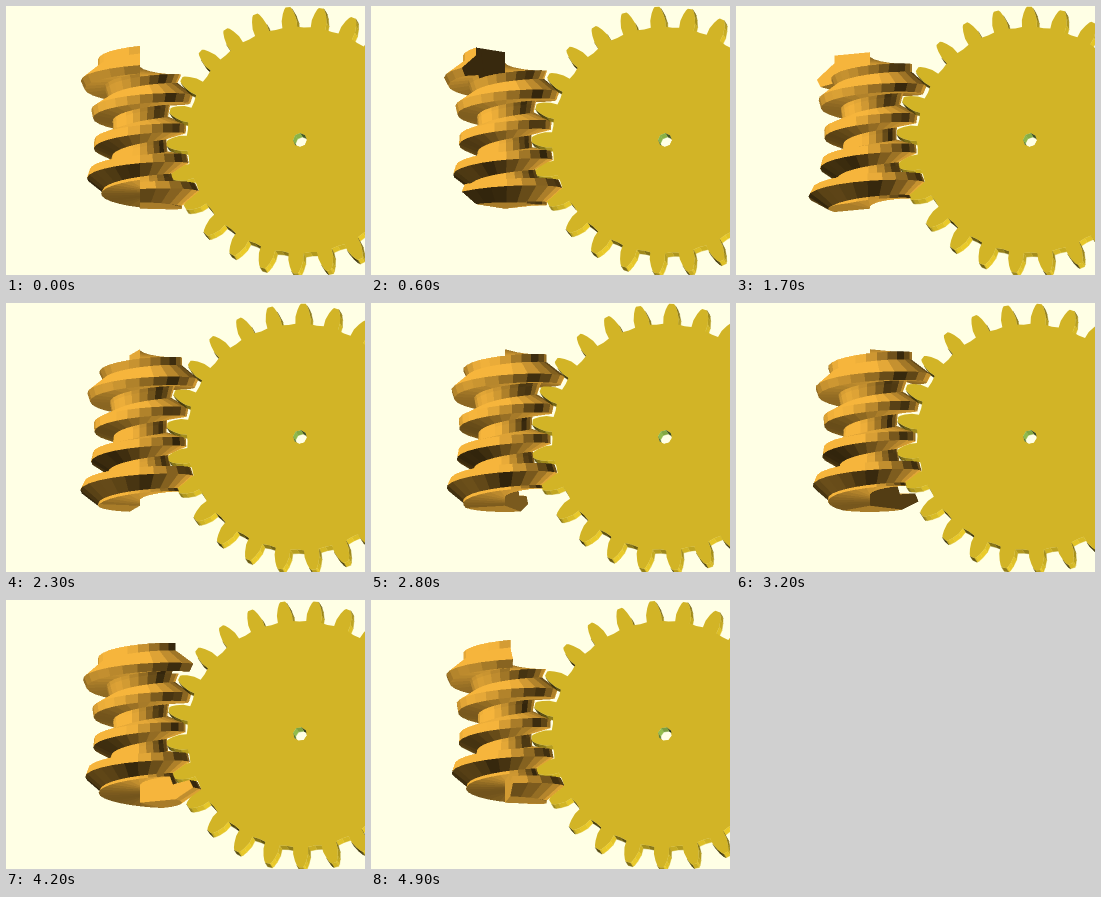
Animation, 359 px wide and 269 px high, one loop 5 s. Source, as an HTML page with a canvas:

```html
<!DOCTYPE html>
<html lang="en">
<head>
<meta charset="utf-8">
<title>Worm drive</title>
<style>
  html, body { margin: 0; width: 100%; height: 100%; overflow: hidden; background: #ffffe5; }
  canvas { display: block; width: 359px; height: 269px; }
</style>
</head>
<body>
<canvas id="stage" width="359" height="269"></canvas>
<script>
const LOOP = 5000, STEPS = 50;
const BG = '#ffffe5', FACE = '#d2b426';
const GEAR_RGB = [249, 215, 44], WORM_RGB = [246, 181, 60], HOLE_RGB = [157, 203, 81];
const RAD = Math.PI / 180, PITCH = 14.4;

const ctx = document.getElementById('stage').getContext('2d');

// One light from the upper left; faces are lit from both sides.
function shade(rgb, x, y, z) {
  const len = Math.hypot(x, y, z) || 1;
  const f = Math.min(1, 0.2 + Math.abs(-x + y + z) / len / Math.sqrt(3));
  return rgb.map(c => Math.round(c * f));
}

// ---- Gear ----
const GEAR = { x: 294, y: 134, teeth: 25, dx: 2.5, dy: 4 };
const TOOTH = [[113, 7.4], [120, 7.5], [127, 5.7], [131.5, 3.8], [133.3, 2.4]];

function gearPoint(a, r, w) {
  const s = Math.sin(a), c = Math.cos(a);
  return [GEAR.x + r * s + w * c, GEAR.y - r * c + w * s];
}

function gearOutline(t) {
  const pts = [];
  for (let k = 0; k < GEAR.teeth; k++) {
    const a = (PITCH * (k + t) - 5.2) * RAD;
    for (const [r, w] of TOOTH) pts.push(gearPoint(a, r, -w));
    for (const [r, w] of [...TOOTH].reverse()) pts.push(gearPoint(a, r, w));
    pts.push(gearPoint(a + PITCH / 2 * RAD, 112.5, 0));
  }
  return pts;
}

function holeOutline(t) {
  return Array.from({ length: 8 }, (_, i) =>
    gearPoint((45 * i + PITCH * t) * RAD, 7, 0));
}

function trace(pts, dx = 0, dy = 0) {
  pts.forEach(([x, y], i) => i ? ctx.lineTo(x + dx, y + dy) : ctx.moveTo(x + dx, y + dy));
  ctx.closePath();
}

// Side walls between the front outline and its shifted copy at the back.
function walls(pts, rgb, side) {
  const { dx, dy } = GEAR;
  pts.forEach((p, i) => {
    const q = pts[(i + 1) % pts.length];
    const nx = (q[1] - p[1]) * side, ny = (p[0] - q[0]) * side;
    if (nx * dx + ny * dy <= 0) return;
    const len = Math.hypot(nx, ny);
    ctx.fillStyle = ctx.strokeStyle = `rgb(${shade(rgb, nx / len, -ny / len, 0.12)})`;
    ctx.lineWidth = 0.4;
    ctx.beginPath();
    trace([p, q, [q[0] + dx, q[1] + dy], [p[0] + dx, p[1] + dy]]);
    ctx.fill();
    ctx.stroke();
  });
}

function drawGear(t) {
  const rim = gearOutline(t), hole = holeOutline(t);
  walls(rim, GEAR_RGB, 1);
  ctx.fillStyle = FACE;
  ctx.beginPath();
  trace(rim);
  ctx.fill();

  ctx.save();
  ctx.beginPath();
  trace(hole);
  ctx.clip();
  ctx.fillStyle = BG;
  ctx.fill();
  walls(hole, HOLE_RGB, -1);
  ctx.restore();
}

// ---- Worm ----
const WORM = { x: 134, y: 130.5, dist: 167.6, tip: 122, core: 141, turns: 4, facets: 24 };
const TILT_S = 0.15, TILT_C = Math.sqrt(1 - TILT_S * TILT_S);
const FRONT = 13;                                  // depth of the gear's front face
const BOX = { x: 60, y: 30, w: 145, h: 185, k: 2 }; // drawn at double size
const W = BOX.w * BOX.k, H = BOX.h * BOX.k;

function layer() {
  const c = document.createElement('canvas');
  c.width = W;
  c.height = H;
  const g = c.getContext('2d');
  return { c, g, img: g.createImageData(W, H) };
}
const back = layer(), front = layer();
const depth = new Float32Array(W * H);

// Cross-section of the thread as [radius, height], from the top of the axis to its bottom.
function profile(mid) {
  const at = (r, off) => {
    const a = (mid + off) * RAD;
    return [WORM.dist - r * Math.cos(a), r * Math.sin(a)];
  };
  const core = off => {
    const [r, h] = at(WORM.core, off);
    return [Math.min(r, 42), Math.max(h, -73)];
  };
  const top = core(8.4), low = core(-6);
  return [[0, top[1]], top, core(4.6), at(WORM.tip, 2.1),
    at(WORM.tip, -2.1), core(-4.6), low, [0, low[1]]];
}

function project(r, h, a) {
  const z = r * Math.cos(a);
  return [
    (WORM.x - r * Math.sin(a) - BOX.x) * BOX.k,
    (WORM.y - h * TILT_C - z * TILT_S - BOX.y) * BOX.k,
    (z * TILT_C - h * TILT_S) * BOX.k
  ];
}

function triangle(a, b, c, rgb) {
  const area = (b[0] - a[0]) * (c[1] - a[1]) - (b[1] - a[1]) * (c[0] - a[0]);
  if (Math.abs(area) < 1e-6) return;
  const x0 = Math.max(0, Math.floor(Math.min(a[0], b[0], c[0])));
  const x1 = Math.min(W - 1, Math.ceil(Math.max(a[0], b[0], c[0])));
  const y0 = Math.max(0, Math.floor(Math.min(a[1], b[1], c[1])));
  const y1 = Math.min(H - 1, Math.ceil(Math.max(a[1], b[1], c[1])));
  for (let y = y0; y <= y1; y++) {
    for (let x = x0; x <= x1; x++) {
      const px = x + 0.5 - a[0], py = y + 0.5 - a[1];
      const v = (px * (c[1] - a[1]) - py * (c[0] - a[0])) / area;
      const w = (py * (b[0] - a[0]) - px * (b[1] - a[1])) / area;
      if (v < 0 || w < 0 || v + w > 1) continue;
      const z = a[2] + v * (b[2] - a[2]) + w * (c[2] - a[2]);
      const i = y * W + x;
      if (z <= depth[i]) continue;
      depth[i] = z;
      const d = back.img.data, j = i * 4;
      d[j] = rgb[0];
      d[j + 1] = rgb[1];
      d[j + 2] = rgb[2];
      d[j + 3] = 255;
    }
  }
}

function quad(a, b, c, d) {
  const u = [c[0] - a[0], a[1] - c[1], c[2] - a[2]];
  const v = [d[0] - b[0], b[1] - d[1], d[2] - b[2]];
  const rgb = shade(WORM_RGB,
    u[1] * v[2] - u[2] * v[1], u[2] * v[0] - u[0] * v[2], u[0] * v[1] - u[1] * v[0]);
  triangle(a, b, c, rgb);
  triangle(a, c, d, rgb);
}

function cap(p) {
  for (let i = 0; i < 3; i++) quad(p[i], p[i + 1], p[6 - i], p[7 - i]);
}

function renderWorm(t) {
  depth.fill(-1e9);
  back.img.data.fill(0);
  front.img.data.fill(0);

  const count = WORM.turns * WORM.facets;
  let prev;
  for (let i = 0; i <= count; i++) {
    const u = i / WORM.facets;
    const ring = profile(PITCH * (WORM.turns / 2 - u))
      .map(([r, h]) => project(r, h, 2 * Math.PI * (t + u)));
    if (prev) {
      for (let j = 0; j < 7; j++) quad(prev[j], prev[j + 1], ring[j + 1], ring[j]);
    }
    if (i === 0 || i === count) cap(ring);
    prev = ring;
  }

  // Whatever is nearer than the gear also goes on the layer above it.
  const from = back.img.data, to = front.img.data;
  for (let i = 0; i < W * H; i++) {
    if (depth[i] <= FRONT * BOX.k) continue;
    for (let j = i * 4; j < i * 4 + 4; j++) to[j] = from[j];
  }
  for (const l of [back, front]) l.g.putImageData(l.img, 0, 0);
}

function draw(t) {
  renderWorm(t);
  ctx.fillStyle = BG;
  ctx.fillRect(0, 0, 359, 269);
  ctx.drawImage(back.c, BOX.x, BOX.y, BOX.w, BOX.h);
  drawGear(t);
  ctx.drawImage(front.c, BOX.x, BOX.y, BOX.w, BOX.h);
}

let shown = -1;
const start = performance.now();
function tick() {
  const time = (performance.now() - start) % LOOP;
  const step = Math.floor(time / LOOP * STEPS);
  if (step !== shown) {
    shown = step;
    draw(step / STEPS);
  }
  requestAnimationFrame(tick);
}
tick();
</script>
</body>
</html>
```
